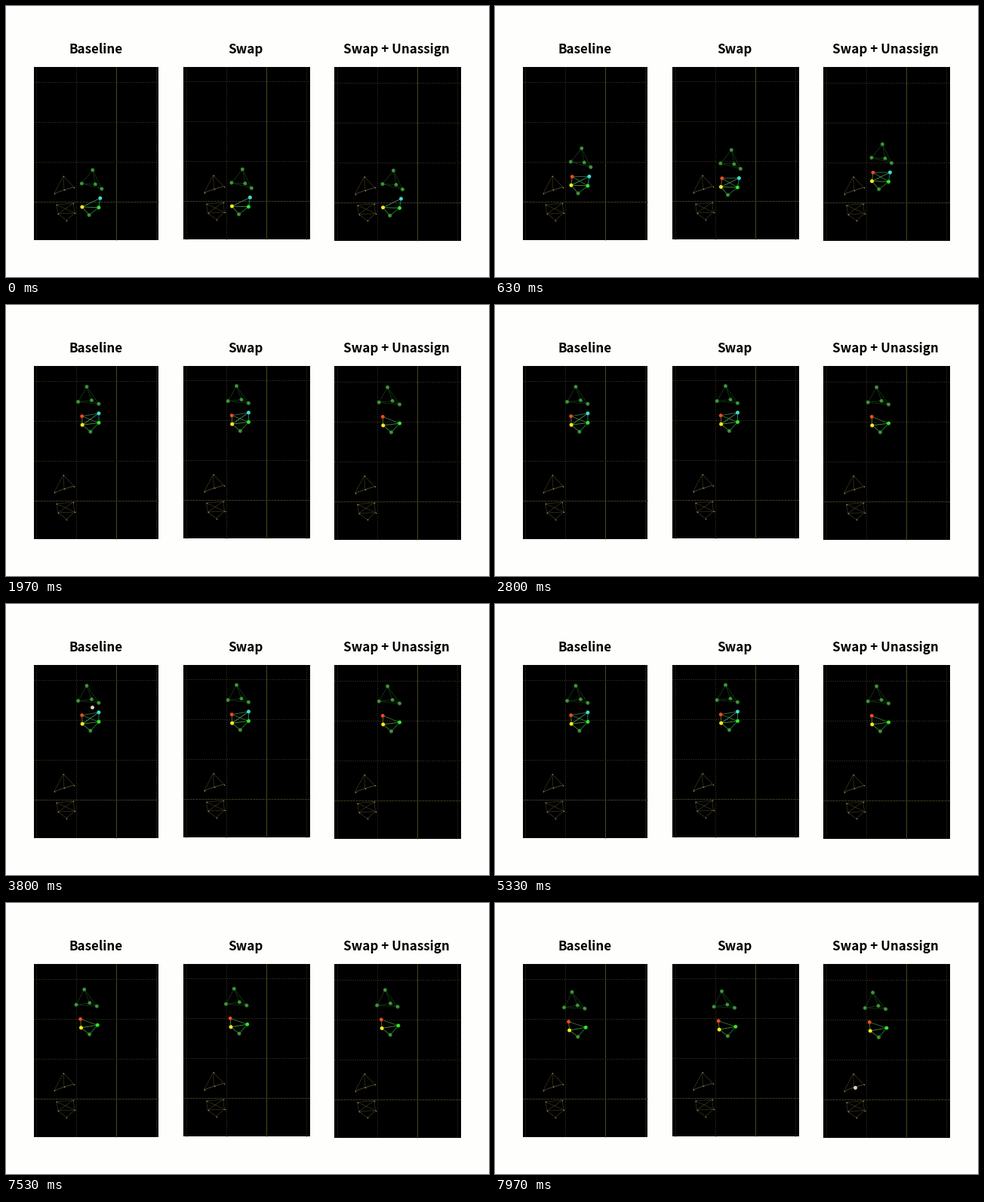
These frames come from a looping animation (640 by 360 pixels, 8 s). A matplotlib script:

```python
from itertools import combinations

import numpy as np
import matplotlib.pyplot as plt
from matplotlib.animation import FuncAnimation
from matplotlib.collections import LineCollection
from matplotlib.colors import to_rgb
from matplotlib.patches import Rectangle

W, H, DPI = 640, 360, 100
FRAMES, STEP = 250, 32
PX = 72 / DPI

fig = plt.figure(figsize=(W / DPI, H / DPI), dpi=DPI, facecolor="#fefefc")
ax = fig.add_axes([0, 0, 1, 1])
ax.set_xlim(0, W)
ax.set_ylim(H, 0)
ax.axis("off")

# title, title centre, box (left, right, bottom), scene shift,
# rise (start, end), time the cyan robot drops out
PANELS = [
    ("Baseline", 119.5, (37, 202, 311), (0, 0), (0.15, 1.51), 7.2),
    ("Swap", 317.5, (235, 403, 310), (198.5, -1), (0.18, 1.54), 7.2),
    ("Swap + Unassign", 517.3, (435, 603, 312), (398.6, 0.7), (0, 1.61), 1.6),
]
BOX_TOP = 81
CELL = 53

# A team is a square of four plus a tip; a kite links all of its four
KITE_LINKS = list(combinations(range(4), 2))
TEAM_LINKS = KITE_LINKS + [(2, 4), (3, 4)]

# Waiting spots in the lower left
KITE_SPOTS = np.array([(76, 226), (64, 249), (77, 244), (90, 240.5)])
TEAM_SPOTS = np.array([(67, 264), (89, 262), (69, 276), (91, 275), (80, 284.5)])

# Robots around the centre of the formation
KITE = np.array([(0, -33), (-13, -14), (5, -14.5), (14, -9)])
TEAM = np.array([(-9.5, 5.5), (13, 3.5), (-10, 17), (12, 16), (0, 27)])
RED, CYAN = 0, 1

DARK = to_rgb("#348a2c")
TEAM_COLORS = np.array([to_rgb(c) for c in
                        ("#e84018", "#38dccc", "#fcea18", "#2ce020")] + [DARK])
TEAL = np.array([0, 0.2, 0.16])

# Brief white blips: x, y, start, end
BLIPS = [(114, 137, 3.6, 4.05), (477, 245.3, 7.8, 8.1)]


def size(d):
    return (d * PX) ** 2


def ease(t, start, end):
    u = np.clip((t - start) / (end - start), 0, 1)
    return u * u * (3 - 2 * u)


def segments(points, links):
    return [points[list(link)] for link in links]


def grid_line(xs, ys, color, dash):
    ax.plot(xs, ys, lw=PX, color=color, ls=dash,
            solid_capstyle="butt", dash_capstyle="butt")


def draw_panel(title, cx, box, shift):
    left, right, bottom = box
    dx, dy = shift
    ax.add_patch(Rectangle((left, BOX_TOP), right - left, bottom - BOX_TOP,
                           fc="black", lw=0))
    ax.text(cx, 63, title, ha="center", va="baseline", color="black",
            family="Noto Sans CJK JP", weight="bold", size=17 * PX)
    for i in range(4):
        x, y = 40 + CELL * i + dx, 101 + CELL * i + dy
        grid_line([x, x], [BOX_TOP, bottom], *(
            ("#48461e", "-") if i == 2 else ("#2c2b1c", (0, (1.5, 1.5)))))
        grid_line([left, right], [y, y], *(
            ("#3e3c22", (0, (3, 1))) if i == 3 else ("#2e2d20", (0, (1.5, 1.5)))))
    for spots, links in ((KITE_SPOTS, KITE_LINKS), (TEAM_SPOTS, TEAM_LINKS)):
        p = spots + shift
        ax.add_collection(LineCollection(segments(p, links), colors="#565030",
                                         linewidths=0.7 * PX, linestyles=[(0, (2, 1))]))
        ax.scatter(*p.T, s=size(1.7), color="#8e8650", lw=0, zorder=3)


def place(points, t, rise):
    """Carry the formation up, tilt it, hold, then let it sink back a little."""
    turn, drop = ease(t, 0.63, 1.97), ease(t, 6.8, 8)
    center = (112.2 - 2.5 * turn - 3.4 * drop,
              250.8 - 109.3 * ease(t, *rise) + 9.5 * drop)
    a = np.radians(4.5 - 9.2 * turn - 2.8 * drop)
    c, s = np.cos(a), np.sin(a)
    return points @ np.array([(c, s), (-s, c)]) + center


for panel in PANELS:
    draw_panel(*panel[:4])

kite_lines = LineCollection([], colors="#1d5420", linewidths=0.8 * PX,
                            linestyles=[(0, (2, 1))], zorder=4)
team_lines = LineCollection([], linewidths=0.9 * PX, zorder=4)
ax.add_collection(kite_lines)
ax.add_collection(team_lines)
balls = ax.scatter([], [], s=size(5), lw=0, zorder=5)
shines = ax.scatter([], [], s=size(2), lw=0, zorder=6)
blips = [ax.scatter([x], [y], s=size(5), color="#dcd2c0", lw=0, zorder=7)
         for x, y, _, _ in BLIPS]


def update(n):
    t = n * STEP / 1000
    kite_segs, team_segs, tints, spots, colors = [], [], [], [], []
    for *_, shift, rise, lost in PANELS:
        kite = place(KITE, t, rise) + shift
        team = place(TEAM, t, rise) + shift
        hidden = {r for r, gone in ((RED, t < 0.3), (CYAN, t >= lost)) if gone}
        seen = [r for r in range(len(TEAM)) if r not in hidden]
        links = [link for link in TEAM_LINKS if not hidden & set(link)]
        kite_segs += segments(kite, KITE_LINKS)
        team_segs += segments(team, links)
        tints += [0.4 * TEAM_COLORS[list(link)].mean(axis=0) + TEAL for link in links]
        spots += [*kite, *team[seen]]
        colors += [DARK] * len(kite) + [*TEAM_COLORS[seen]]
    kite_lines.set_segments(kite_segs)
    team_lines.set_segments(team_segs)
    team_lines.set_color(tints)
    spots, colors = np.array(spots), np.array(colors)
    balls.set_offsets(spots)
    balls.set_facecolor(colors)
    shines.set_offsets(spots - 0.3)
    shines.set_facecolor(0.75 * colors + 0.2)
    for dot, (_, _, start, end) in zip(blips, BLIPS):
        dot.set_visible(start <= t < end)
    return [kite_lines, team_lines, balls, shines, *blips]


anim = FuncAnimation(fig, update, frames=FRAMES, interval=STEP,
                     init_func=lambda: update(0), repeat=True, repeat_delay=0)
plt.show()
```
